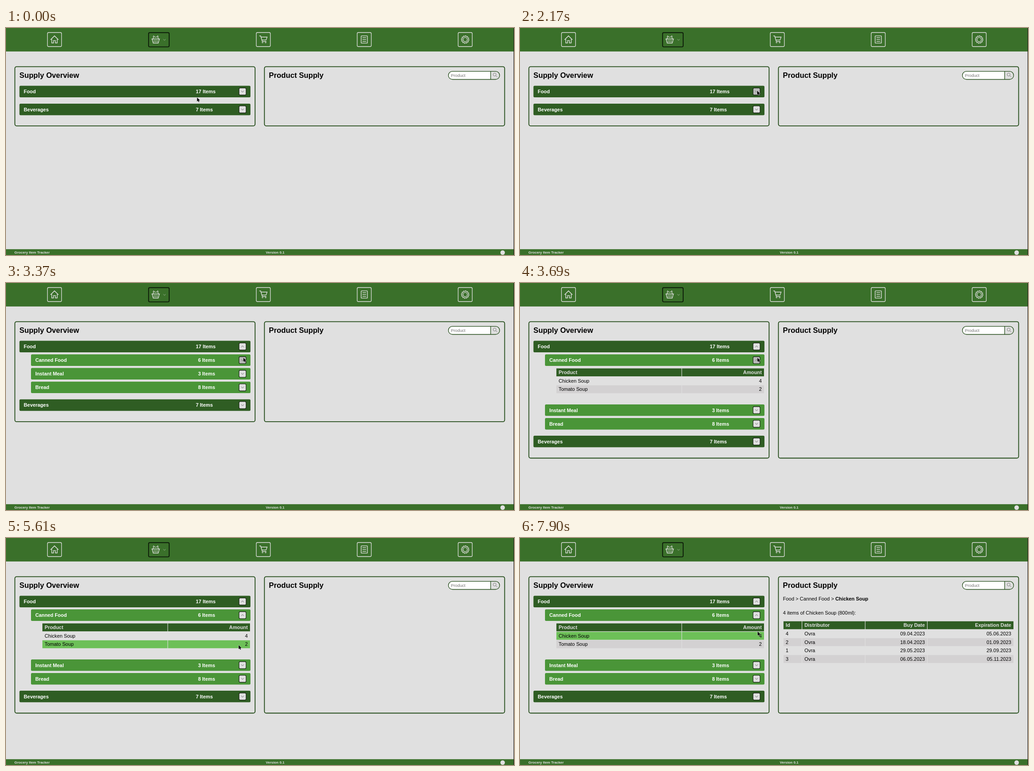
Recreate the animation shown at these times as an HTML page with a canvas. Size 1118 by 501 pixels, loop 7990 ms.

```html
<!DOCTYPE html>
<html lang="en">
<head>
<meta charset="utf-8">
<title>Grocery Item Tracker</title>
<style>
  html, body { margin: 0; width: 100%; height: 100%; overflow: hidden; background: #e0e0e0; }
  canvas { display: block; }
</style>
</head>
<body>
<canvas id="stage" width="1118" height="501"></canvas>
<script>
const ctx = document.getElementById('stage').getContext('2d');
const LOOP = 7990;
const FOOD_OPEN = 2240, CANNED_OPEN = 3690, DETAILS_OPEN = 6430;
const C = {
  page: '#e0e0e0', nav: '#3a702a', dark: '#2f5d23', leaf: '#4a9538',
  hover: '#6dc058', border: '#244c1a', stripe: '#d3d1d2', pressed: '#bababa', icon: '#e0e0e0'
};

// Pointer moves: first step, last step, number of steps, destination
const MOVES = [
  [110, 110, 1, 335.5, 106.5],
  [260, 340, 2, 145, 0],
  [580, 670, 2, 180, 35.5],
  [820, 900, 2, 302.5, 72],
  [1060, 1460, 6, 484.5, 119],
  [1620, 1930, 5, 522, 138.5],
  [2820, 3370, 8, 522.5, 165],
  [4430, 4830, 6, 520.5, 204.5],
  [4910, 5210, 5, 514, 231],
  [5290, 5370, 2, 512, 238],
  [5610, 5610, 1, 512, 236.5],
  [5690, 5850, 3, 512, 217.5],
  [7750, 7900, 3, 523, 206.5]
];

function pointerAt(t) {
  let x = 420.5, y = 153.5;
  for (const [start, end, steps, toX, toY] of MOVES) {
    if (t < start) break;
    const gap = steps > 1 ? (end - start) / (steps - 1) : 1;
    const k = Math.min(steps, Math.floor((t - start) / gap + 1e-6) + 1) / steps;
    x += (toX - x) * k;
    y += (toY - y) * k;
  }
  return { x, y };
}

function rect(x, y, w, h, fill) {
  ctx.fillStyle = fill;
  ctx.fillRect(x, y, w, h);
}

function box(x, y, w, h, r, fill, stroke, line) {
  ctx.beginPath();
  ctx.roundRect(x, y, w, h, r);
  if (fill) { ctx.fillStyle = fill; ctx.fill(); }
  if (stroke) { ctx.strokeStyle = stroke; ctx.lineWidth = line; ctx.stroke(); }
}

function path(points, color, line, close) {
  ctx.beginPath();
  points.forEach(([x, y]) => ctx.lineTo(x, y));
  if (close) ctx.closePath();
  ctx.strokeStyle = color;
  ctx.lineWidth = line;
  ctx.stroke();
}

function ring(x, y, r, color, line) {
  ctx.beginPath();
  ctx.arc(x, y, r, 0, Math.PI * 2);
  ctx.strokeStyle = color;
  ctx.lineWidth = line;
  ctx.stroke();
}

function text(str, x, y, color = '#000', bold = false, size = 10.87, align = 'left') {
  ctx.font = `${bold ? 'bold ' : ''}${size}px "Liberation Sans", Arial, sans-serif`;
  ctx.textAlign = align;
  ctx.fillStyle = color;
  ctx.fillText(str, x, y);
  return ctx.measureText(str).width;
}

function chevron(x, y, up, color, w = 2.9) {
  const d = up ? -1.5 : 1.5;
  path([[x - w, y - d], [x, y + d], [x + w, y - d]], color, 1);
}

function houseIcon() {
  path([[98, 26], [106.7, 17.4], [115.4, 26]], C.icon, 1.5);
  path([[100.7, 24.5], [100.7, 33], [104.7, 33], [104.7, 27.6], [108.7, 27.6],
        [108.7, 33], [112.7, 33], [112.7, 24.5]], C.icon, 1.4);
}

function basketIcon() {
  path([[320.3, 24.3], [338.7, 24.3]], C.icon, 1.5);
  path([[321.7, 25], [324, 33.3], [335, 33.3], [337.3, 25]], C.icon, 1.4);
  for (const x of [326.2, 329.5, 332.8]) path([[x, 26.8], [x, 31]], C.icon, 1.2);
  path([[323, 24], [326.6, 18.5]], C.icon, 1.1);
  path([[336, 24], [332.4, 18.5]], C.icon, 1.1);
  path([[323.5, 20.5], [324.8, 17], [328, 20.2], [331.2, 20.2], [334, 16.8], [335.6, 20.5]], C.icon, 1);
}

function cartIcon() {
  path([[557.5, 17.5], [560.5, 17.5], [564, 29.5], [573, 29.5]], C.icon, 1.4);
  path([[561.3, 20], [574.7, 20], [572.4, 26.3], [563.2, 26.3]], C.icon, 1.3);
  ring(564.6, 32, 1.2, C.icon, 1);
  ring(571.4, 32, 1.2, C.icon, 1);
}

function listIcon() {
  box(781.6, 17.4, 13.8, 16, 0.8, null, C.icon, 1.4);
  for (const y of [21.3, 25.4, 29.5]) path([[784.5, y], [792.6, y]], C.icon, 1.3);
}

function gearIcon() {
  const x = 1010.6, y = 25.5, teeth = 12;
  const points = [];
  for (let i = 0; i < teeth * 4; i++) {
    const a = (i + 0.5) / (teeth * 4) * Math.PI * 2;
    const r = i % 4 < 2 ? 8.5 : 7;
    points.push([x + Math.cos(a) * r, y + Math.sin(a) * r]);
  }
  path(points, C.icon, 1.2, true);
  ring(x, y, 4.6, C.icon, 1.3);
}

function frame() {
  rect(0, 0, 1118, 501, C.page);
  rect(0, 0, 1118, 51.8, C.nav);
  rect(0, 488.2, 1118, 13, C.nav);

  for (const x of [91.3, 550.8, 772.9, 995.1]) box(x, 10, 31, 31, 2.5, null, C.icon, 1.3);
  box(313.8, 10.3, 45.3, 31.3, 2.5, null, '#0d1c09', 1.9);
  houseIcon();
  basketIcon();
  chevron(348.8, 26, false, '#93ad8a', 2.6);
  cartIcon();
  listIcon();
  gearIcon();

  text('Grocery Item Tracker', 18.6, 498.2, C.icon, true, 7.76);
  text('Version 0.1', 571.8, 498.2, C.icon, true, 7.76);
  ctx.beginPath();
  ctx.arc(1093, 495.8, 5, 0, Math.PI * 2);
  ctx.fillStyle = C.icon;
  ctx.fill();
}

function searchField() {
  const x = 973.6, y = 95.7, w = 112.8, h = 17.8, split = 1066.6;
  box(x, y, split - x, h, [9, 0, 0, 9], '#fff');
  box(x, y, w, h, 9, null, C.border, 1.3);
  path([[split, y], [split, y + h]], C.border, 1.3);
  text('Product', 979, 108, '#757575', false, 9.32);
  ring(1075.4, 102.8, 3.3, '#777', 0.9);
  path([[1077.8, 105.2], [1081.3, 108.7]], '#777', 1);
}

function bar(name, count, mid, open, pointer, sub) {
  const x = sub ? 55 : 29.6;
  box(x, mid - 12.7, 538 - x, 25.4, 2.5, sub ? C.leaf : C.dark);
  text(name, x + 9.4, mid + 3.9, '#fff', true);
  text(count + ' Items', sub ? 422.8 : 417.8, mid + 3.9, '#fff', true);
  const over = Math.abs(pointer.x - 520.6) < 8 && Math.abs(pointer.y - mid) < 8;
  box(512.9, mid - 7.7, 15.4, 15.4, 2.4, over ? C.pressed : C.page, '#0c1609', 1.1);
  chevron(520.6, mid, open, '#666');
}

// cols: [left, right, title, align]
function table(cols, top, rows, hovered) {
  const pitch = 18.64, h = 17.5;
  [cols.map(c => c[2]), ...rows].forEach((cells, i) => {
    const y = top + i * pitch;
    const fill = i === 0 ? C.dark : i === hovered ? C.hover : i % 2 ? C.page : C.stripe;
    cols.forEach(([left, right, , align], j) => {
      rect(left, y, right - left, h, fill);
      const x = align === 'right' ? right - 4.9 : left + 4.9;
      text(cells[j], x, y + 12.5, i ? '#000' : C.page, !i, 10.87, align);
    });
  });
}

function details() {
  const w = text('Food > Canned Food > ', 578.7, 137.6);
  text('Chicken Soup', 578.7 + w, 137.6, '#000', true);
  text('4 items of Chicken Soup (800ml):', 578.7, 169);
  table([
    [579.9, 620, 'Id', 'left'],
    [621.1, 759.1, 'Distributor', 'left'],
    [760.2, 895.9, 'Buy Date', 'right'],
    [897, 1086, 'Expiration Date', 'right']
  ], 183.8, [
    ['4', 'Ovra', '09.04.2023', '05.06.2023'],
    ['2', 'Ovra', '18.04.2023', '01.09.2023'],
    ['1', 'Ovra', '29.05.2023', '29.09.2023'],
    ['3', 'Ovra', '06.05.2023', '05.11.2023']
  ]);
}

function drawPointer({ x, y }) {
  ctx.beginPath();
  [[0, 0], [0, 8.7], [2, 6.9], [3.5, 10.1], [5, 9.4], [3.6, 6.4], [6.3, 6.2]]
    .forEach(([dx, dy]) => ctx.lineTo(x + dx, y + dy));
  ctx.closePath();
  ctx.strokeStyle = '#e8e8e8';
  ctx.lineWidth = 1;
  ctx.stroke();
  ctx.fillStyle = '#000';
  ctx.fill();
}

function draw(t) {
  const pointer = pointerAt(t);
  const food = t >= FOOD_OPEN, canned = t >= CANNED_OPEN;
  const shift = canned ? 80.3 : 0;
  const bottom = (food ? 306.2 : 216.1) + shift;

  frame();
  for (const x of [19.5, 568.7]) box(x, 85.3, 528.7, bottom - 85.3, 4, null, C.border, 1.8);
  text('Supply Overview', 29.6, 110.2, '#000', true, 16.3);
  text('Product Supply', 578.6, 110.2, '#000', true, 16.3);
  searchField();

  bar('Food', 17, 140.2, food, pointer);
  if (food) {
    bar('Canned Food', 6, 170.3, canned, pointer, true);
    bar('Instant Meal', 3, 200.3 + shift, false, pointer, true);
    bar('Bread', 8, 230.4 + shift, false, pointer, true);
  }
  bar('Beverages', 7, (food ? 269.5 : 179.7) + shift, false, pointer);

  if (canned) {
    const hovered = pointer.y < 205.5 ? 0 : pointer.y < 225 ? 1 : 2;
    table([[80.1, 355.4, 'Product', 'left'], [356.5, 537, 'Amount', 'right']],
      188.5, [['Chicken Soup', '4'], ['Tomato Soup', '2']], hovered);
  }
  if (t >= DETAILS_OPEN) details();
  rect(1117, 0, 1, 501, '#1c1c1c');
  drawPointer(pointer);
}

const began = performance.now();
function tick() {
  draw((performance.now() - began) % LOOP);
  requestAnimationFrame(tick);
}
tick();
</script>
</body>
</html>
```
